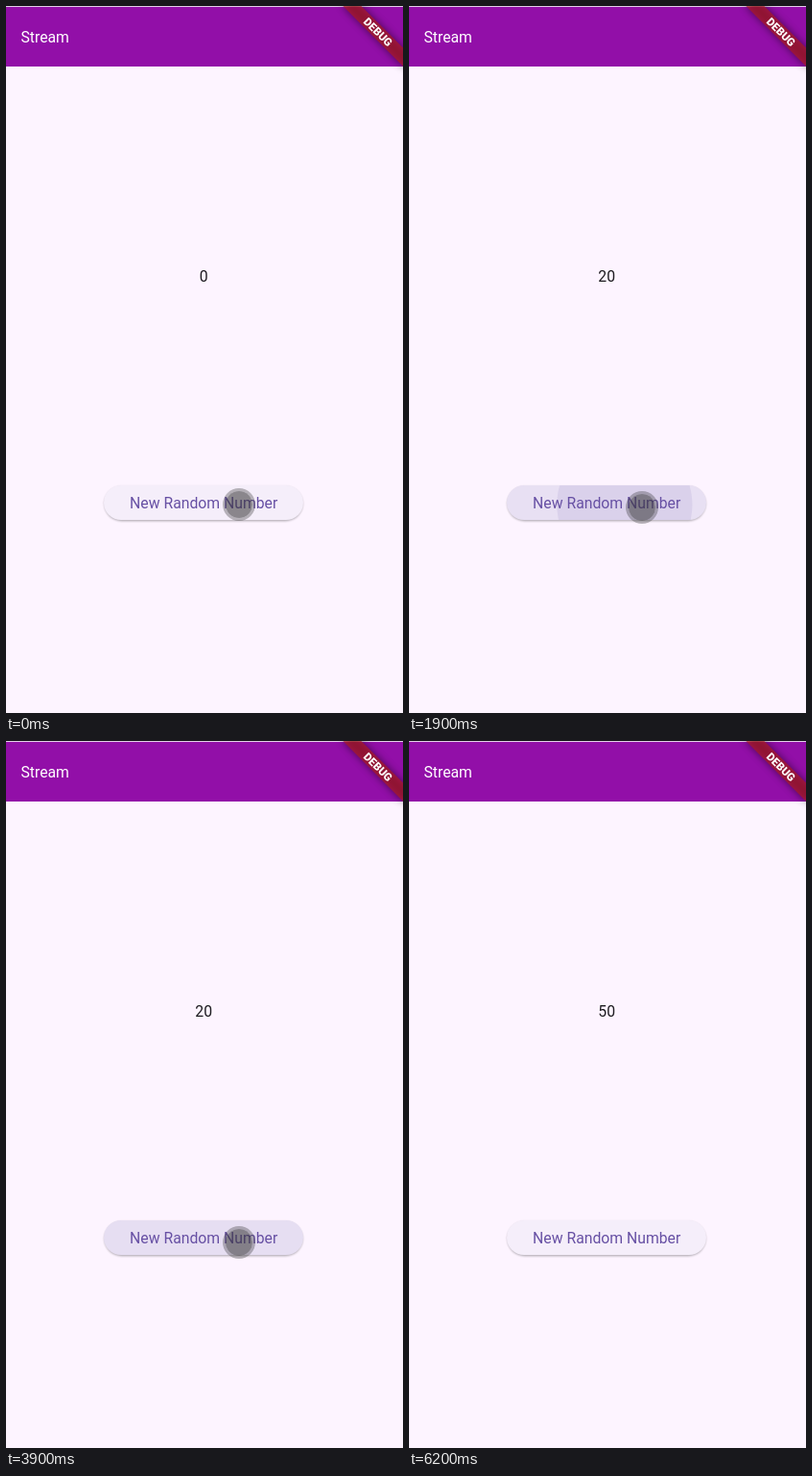
Animation, 414 px wide and 736 px high, one loop 6.3 s. Source, as an HTML page:

```html
<!DOCTYPE html>
<html lang="en">
<head>
<meta charset="utf-8">
<title>Stream</title>
<style>
  html, body { margin: 0; width: 100%; height: 100%; overflow: hidden; background: #fdf4ff; }
  svg { display: block; width: 414px; height: 736px; }
  text { font: 15.75px Roboto, sans-serif; white-space: pre; }
  .mid { text-anchor: middle; }
</style>
</head>
<body>
<svg viewBox="0 0 414 736">
  <defs>
    <clipPath id="pill"><rect x="102" y="499" width="208" height="36" rx="18"/></clipPath>
    <filter id="soft" x="-50%" y="-150%" width="200%" height="400%"><feGaussianBlur stdDeviation="4.4"/></filter>
    <filter id="lift" x="-10%" y="-30%" width="120%" height="170%"><feGaussianBlur stdDeviation="0.8"/></filter>
  </defs>

  <rect width="414" height="736" fill="#fdf4ff"/>
  <rect width="414" height="63" fill="#920fa8"/>
  <rect width="414" height="1" fill="#e6cfec"/>
  <text x="15.5" y="38" fill="#fff">Stream</text>
  <text id="count" class="mid" x="206.2" y="287" fill="#1d1b20">0</text>

  <rect x="102.5" y="500.2" width="207" height="36" rx="18" opacity=".3" filter="url(#lift)"/>
  <g clip-path="url(#pill)">
    <rect x="102" y="499" width="208" height="36" fill="#f5eefa"/>
    <rect id="press" x="102" y="499" width="208" height="36" fill="#6750a4"/>
    <circle id="ripple" fill="#6750a4"/>
  </g>
  <text class="mid" x="206.2" y="522.6" fill="#6750a4">New Random Number</text>

  <g transform="translate(415 0) rotate(45)">
    <rect x="-45" y="31.5" width="90" height="13.5" opacity=".5" filter="url(#soft)"/>
    <rect x="-45" y="31.5" width="90" height="13.5" fill="#b71c1c" fill-opacity=".63"/>
    <text class="mid" y="42.3" fill="#fff" style="font-size:11.475px;font-weight:900">DEBUG</text>
  </g>

  <g id="pointer" fill="#323232">
    <path fill-opacity=".33" fill-rule="evenodd" d="M-17 0a17 17 0 1 0 34 0a17 17 0 1 0-34 0M-14 0a14 14 0 1 0 28 0a14 14 0 1 0-28 0"/>
    <circle r="14" fill-opacity=".55"/>
  </g>
</svg>
<script>
const LOOP = 6300, STEP = 100, HOLD = 200, TINT = 0.1;
// [press time, number shown after release]
const taps = [[375, 30], [1116, 40], [1680, 20], [2254, 20], [2875, 20], [3495, 20], [4500, 50]];
// [time, x, y]
const path = [[0, 243, 519], [1600, 243, 519], [1700, 243, 522], [4700, 243, 522],
  [4800, 187, 452], [4900, 112, 362], [5200, 76, 318], [5500, 49, 288]];
const GONE = 5600;

const $ = id => document.getElementById(id);
const clamp = v => Math.min(1, Math.max(0, v));
const mix = (a, b, k) => a + (b - a) * k;
const set = (el, attrs) => { for (const k in attrs) el.setAttribute(k, attrs[k]); };

// cubic-bezier(.25, .1, .25, 1)
function ease(x) {
  const bez = (a, b, u) => 3 * a * u * (1 - u) ** 2 + 3 * b * u * u * (1 - u) + u ** 3;
  let lo = 0, hi = 1;
  for (let i = 0; i < 24; i++) {
    const u = (lo + hi) / 2;
    if (bez(0.25, 0.25, u) < x) lo = u; else hi = u;
  }
  return bez(0.1, 1, lo);
}

function pointerAt(t) {
  const i = path.findIndex(p => p[0] > t);
  if (i < 0) return path[path.length - 1].slice(1);
  const a = path[i - 1], b = path[i], k = (t - a[0]) / (b[0] - a[0]);
  return [mix(a[1], b[1], k), mix(a[2], b[2], k)];
}

function drawButton(t) {
  const tap = taps.filter(p => p[0] <= t).pop();
  const age = tap ? t - tap[0] : 1e4;
  const up = age - HOLD;
  // slow growth while held, fast after release
  const grow = ease(clamp(Math.min(age, HOLD) / 1000 + Math.max(0, up) / 225));
  const fade = clamp(age / 75) * (1 - clamp((up - 225) / 150));
  const [x, y] = pointerAt(tap ? tap[0] : 0);
  set($('press'), { opacity: TINT * clamp(age / 200) * (1 - clamp(up / 200)) });
  set($('ripple'), {
    cx: mix(x, 206, grow), cy: mix(y, 517, grow),
    r: mix(31.6, 111, grow), opacity: TINT * fade
  });
}

function draw(now) {
  const t = Math.floor(now % LOOP / STEP) * STEP;
  const done = taps.filter(p => p[0] + HOLD <= t).pop();
  $('count').textContent = done ? done[1] : 0;
  drawButton(t);
  set($('pointer'), {
    transform: `translate(${pointerAt(t)})`,
    visibility: t < GONE ? 'visible' : 'hidden'
  });
}

const start = performance.now();
function tick() {
  draw(performance.now() - start);
  requestAnimationFrame(tick);
}
tick();
</script>
</body>
</html>
```
